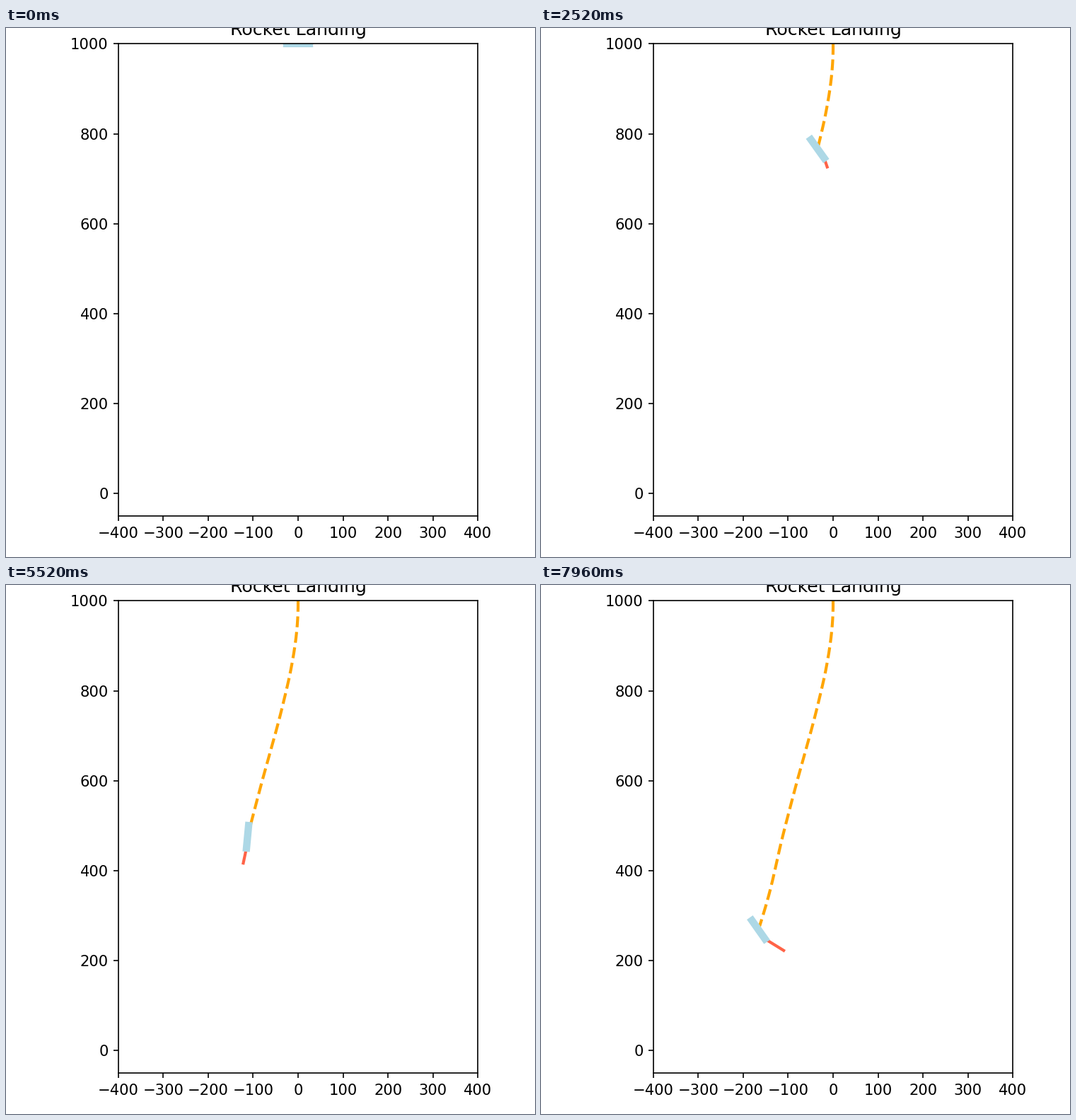
A matplotlib script that plays this animation: 748 by 748 pixels, repeating every 8 s.

```python
import numpy as np
import matplotlib.pyplot as plt
from matplotlib.animation import FuncAnimation

SIZE = 748
DPI = 136
SCALE = 1.1  # enlarges the usual line widths and tick sizes
FRAMES = 200
INTERVAL = 40
HALF = 25    # half of the rocket's length, in data units

# key poses: step, x, y, tilt, exhaust angle, exhaust length
# (angles in degrees below the x axis)
POSES = np.array([
    (0, 0, 1000, 0, -20, 38),
    (24, -4.7, 917.4, 10, 21.5, 36.5),
    (42, -15.7, 849, 28.4, 20, 21),
    (63, -34.5, 766.5, 54.4, 71, 21),
    (107, -82.5, 590, 94.1, 115, 35.5),
    (138, -112.4, 475.5, 95.4, 102, 34.4),
    (176, -143.4, 344, 71.1, 66, 32),
    (199, -166, 269, 54.8, 31.7, 49),
])


def glide(t, keys, values):
    """Smooth curve through the key values."""
    rate = np.gradient(values, keys, edge_order=2)
    i = np.clip(np.searchsorted(keys, t, side="right") - 1, 0, len(keys) - 2)
    h = keys[i + 1] - keys[i]
    s = (t - keys[i]) / h
    return ((1 + 2 * s) * (1 - s) ** 2 * values[i]
            + s * (1 - s) ** 2 * h * rate[i]
            + s ** 2 * (3 - 2 * s) * values[i + 1]
            + s ** 2 * (s - 1) * h * rate[i + 1])


def heading(degrees):
    a = np.radians(degrees)
    return np.column_stack([np.cos(a), -np.sin(a)])


steps = np.arange(FRAMES)
keys = POSES[:, 0]
x, y, tilt, jet_angle, jet_length = (glide(steps, keys, v) for v in POSES[:, 1:].T)

center = np.column_stack([x, y])
nose = center - HALF * heading(tilt)
tail = center + HALF * heading(tilt)
tip = tail + jet_length[:, None] * heading(jet_angle)

fig = plt.figure(figsize=(SIZE / DPI, SIZE / DPI), dpi=DPI, facecolor="white")
left, right, top, bottom = 158.7, 667.3, 22.4, 690.3
ax = fig.add_axes([left / SIZE, 1 - bottom / SIZE,
                   (right - left) / SIZE, (bottom - top) / SIZE])
ax.set_xlim(-400, 400)
ax.set_ylim(-50, 1000)
ax.set_xticks(range(-400, 401, 100))
ax.set_yticks(range(0, 1001, 200))
ax.tick_params(labelsize=11.17, length=3.5 * SCALE, width=0.8 * SCALE, pad=3.5 * SCALE)
ax.tick_params(axis="y", pad=3.2 * SCALE)
for spine in ax.spines.values():
    spine.set_linewidth(0.8 * SCALE)
ax.set_title("Rocket Landing", fontsize=13.4, pad=6.1 * SCALE)

trail, = ax.plot([], [], "--", color="orange", lw=2 * SCALE)
jet, = ax.plot([], [], color="tomato", lw=2 * SCALE)
rocket, = ax.plot([], [], color="lightblue", lw=5 * SCALE)


def update(k):
    trail.set_data(*center[:k + 1].T)
    jet.set_data(*np.array([tail[k], tip[k]]).T)
    rocket.set_data(*np.array([nose[k], tail[k]]).T)
    return trail, jet, rocket


anim = FuncAnimation(fig, update, frames=FRAMES, interval=INTERVAL,
                     repeat=True, repeat_delay=0, init_func=lambda: update(0))
plt.show()
```
